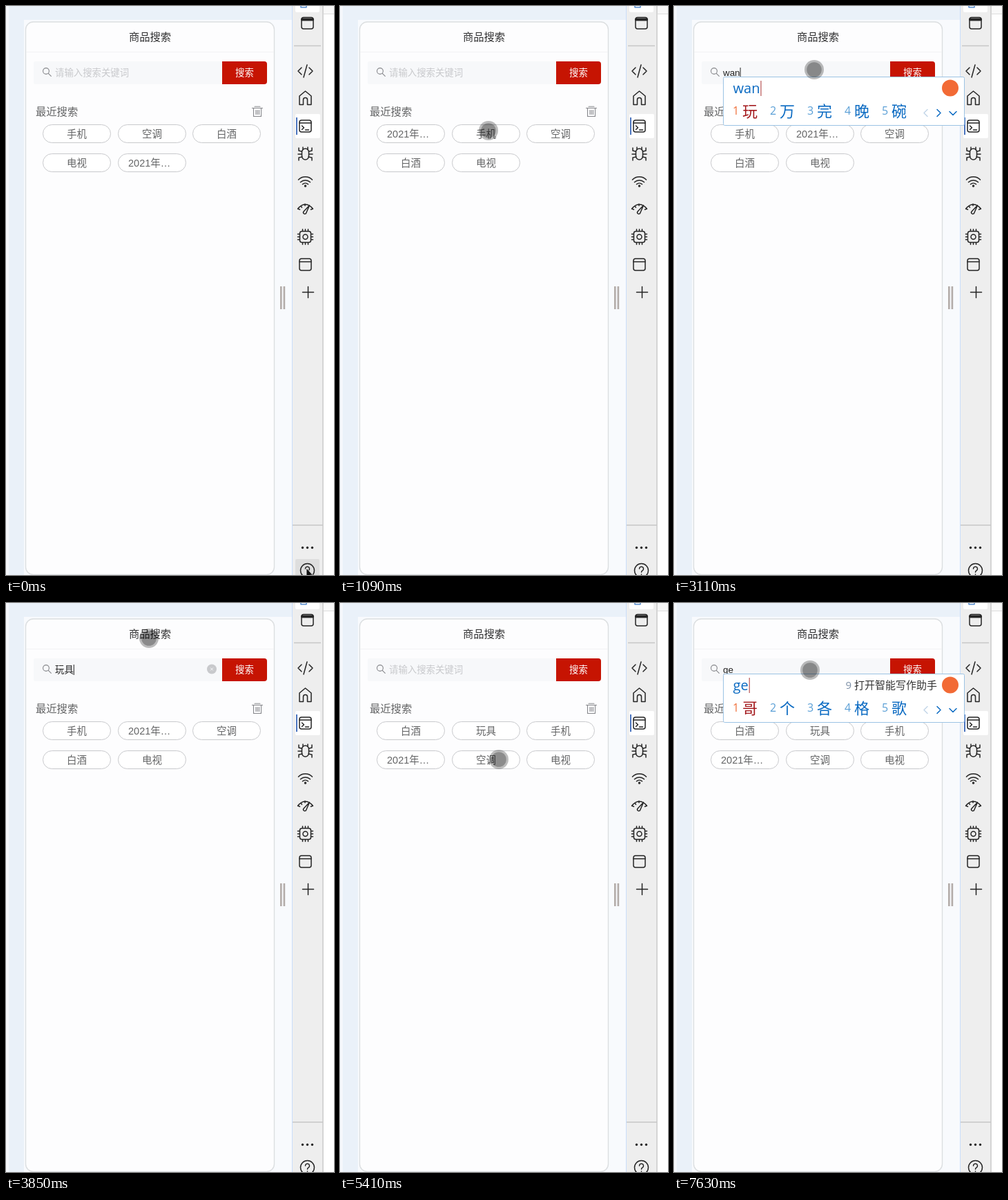
Animation of 475 by 822 pixels, one loop 8000 ms. Source, as an HTML page:

```html
<!DOCTYPE html>
<html lang="zh-CN">
<head>
<meta charset="utf-8">
<title>商品搜索</title>
<style>
  html, body { margin: 0; width: 100%; height: 100%; overflow: hidden; background: #fff; }
  svg { display: block; font-family: "Liberation Sans", "Noto Sans CJK SC", "Noto Sans CJK", sans-serif; }
  .icon { fill: none; stroke: #252525; stroke-width: 1.5; stroke-linecap: round; stroke-linejoin: round; }
  .grey { stroke: #85868a; stroke-width: 1.1; }
  .mid { text-anchor: middle; }
  .tag { fill: #fff; stroke: #c8c9cc; }
  .label { font-size: 14.5px; fill: #646566; }
  .field { font-size: 13.4px; }
  #ime { font-family: "Open Sans", "Noto Sans CJK SC", "Noto Sans CJK", sans-serif; }
</style>
</head>
<body>
<svg width="475" height="822" viewBox="0 0 475 822">
  <!-- backdrop -->
  <rect width="4" height="822" fill="#f5f8fc"/>
  <rect x="4" width="411" height="822" fill="#eaf1f9"/>
  <rect x="26" y="20" width="388" height="802" fill="#f8fafd"/>
  <rect x="28.5" y="23" width="360" height="798.5" rx="11" fill="#fdfdfe" stroke="#dcdfe1" stroke-width="1.4"/>
  <path d="M397 405h2.6v33h-2.6zM401.6 405h2.6v33h-2.6z" fill="#b3aca9"/>

  <!-- page -->
  <text class="mid" x="208.5" y="50" font-size="15.3" fill="#323233">商品搜索</text>
  <path d="M29 66.5h359" stroke="#f2f3f5"/>
  <rect x="40" y="80" width="274" height="33" rx="2" fill="#f7f8fa"/>
  <g class="icon grey"><circle cx="58" cy="94" r="4.4"/><path d="M61.3 97.3l4 4"/></g>
  <path d="M313 80h61a4 4 0 0 1 4 4v25a4 4 0 0 1-4 4h-61z" fill="#c61402"/>
  <text class="mid field" x="345.5" y="100.5" fill="#fff">搜索</text>
  <text class="field" id="hint" x="71" y="100.5" fill="#c8c9cc">请输入搜索关键词</text>
  <text class="field" id="typed" x="71" y="100.5" fill="#222"></text>
  <rect id="caret" y="89" width="1" height="15" fill="#222"/>
  <g id="clear"><circle cx="298" cy="95.5" r="7" fill="#c8c9cc"/><path d="M296 93.5l4 4m0-4l-4 4" stroke="#f7f8fa"/></g>
  <text x="43" y="158" font-size="15.3" fill="#646566">最近搜索</text>
  <path class="icon grey" d="M356.5 147.5h15M358.5 147.5v12h11v-12M360 145.3h8M362 150.5v6m2.2-6v6m2.3-6v6"/>
  <g id="tags"></g>

  <!-- tool strip -->
  <rect x="415" width="44" height="822" fill="#eee"/>
  <path d="M414.5 0v822" stroke="#c9defa"/>
  <path d="M459 0v822" stroke="#ccc" stroke-width="1.6"/>
  <rect x="460" width="15" height="822" fill="#fff"/>
  <path d="M460 0h15v11h-15z" fill="#f8f8f8"/><path d="M460 11.5h15" stroke="#ddd"/>
  <path d="M419 0h35v7a2 2 0 0 1-2 2h-31a2 2 0 0 1-2-2z" fill="#fff"/>
  <path class="icon" d="M427 0v2h8v-2" style="stroke:#5a8fd0"/>
  <path d="M417 57.5h39M415 750h44" stroke="#c6c6c6" stroke-width="1.4"/>
  <rect x="419" y="156" width="36" height="35" rx="2" fill="#fff"/>
  <rect x="420" y="161" width="2" height="25" fill="#4b74be"/>
  <g class="icon">
    <rect x="428" y="16.5" width="17" height="16.5" rx="3"/><path d="M429 19.5h15" stroke-width="4"/>
    <path d="M428 89l-5 5 5 5m11-10l5 5-5 5m-3-14l-5 18"/>
    <path d="M425 130l8.5-7 8.5 7v12.5h-5.5v-7a3 3 0 0 0-6 0v7H425z"/>
    <rect x="425" y="165" width="17" height="17" rx="3"/><path d="M425 169h17M428.5 173l3 2.7-3 2.8m5 .5h5"/>
    <rect x="428.5" y="206" width="10" height="16" rx="5"/>
    <path d="M430 207v-3m7 3v-3M428 210l-4-1v-4m15 5l4-1v-4M428 214h-5m16 0h5M429 218l-5 1v4m14-5l5 1v4"/>
    <path d="M423.5 251a14 14 0 0 1 20 0M426.5 254.5a10 10 0 0 1 14 0M429.5 257.5a6 6 0 0 1 8 0"/><circle cx="433.5" cy="260" r="1"/>
    <path d="M422.500 293q11-13 22 0l-3 1M422.500 293l3 1M433 286v2.500M439.500 288l-8.500 9a2 2 0 0 0 3.500 2.500zM427 289l1.500 2"/>
    <rect x="425.500" y="325.500" width="16" height="16" rx="3"/><circle cx="433.500" cy="333.500" r="3.500"/>
    <path d="M429.500 325v-2.500m4 2.500v-2.500m4 2.500v-2.500M429.500 342v2.500m4-2.500v2.500m4-2.500v2.500M425 329.500h-2.500m2.500 4h-2.500m2.500 4h-2.500M442 329.500h2.500m-2.500 4h2.500m-2.500 4h2.500"/>
    <rect x="425" y="365" width="17" height="17" rx="3"/><path d="M425 369.500h17"/>
    <path d="M429.500 413.500h16m-8-8v16"/>
  </g>
  <g fill="#222"><circle cx="429.500" cy="782.500" r="1.700"/><circle cx="436.500" cy="782.500" r="1.700"/><circle cx="443.500" cy="782.500" r="1.700"/></g>
  <rect id="hover" x="419" y="799" width="35" height="24" rx="2" fill="#dedede"/>
  <g class="icon"><circle cx="436.500" cy="815.500" r="10"/><path d="M433.500 813a3 3 0 1 1 4.500 2.600q-1.500 1-1.500 2.400m0 3v.2"/></g>

  <!-- input method window -->
  <g id="ime" transform="translate(71 102)">
    <rect id="panel" x=".5" y=".5" height="70" rx="2" fill="#fff" stroke="#9cc3e4"/>
    <text id="pinyin" x="14.500" y="24" font-size="20" fill="#0a6ac2"></text>
    <rect id="bar" y="6" width="1" height="22" fill="#a33"/>
    <g id="words"></g>
    <g id="right">
      <text id="assist" x="-40" y="22" font-size="15" fill="#333" text-anchor="end"><tspan fill="#7c8fa6">9</tspan> 打开智能写作助手</text>
      <circle cx="-21" cy="16.500" r="12" fill="#f26a35"/>
      <g class="icon"><path d="M-54 47.500l-5 5 5 5" style="stroke:#c3d6e8"/><path d="M-40 47.500l5 5-5 5M-22 50.500l5 5 5-5" style="stroke:#0a6ac2"/></g>
    </g>
  </g>

  <g id="touch"><circle r="14" opacity=".26"/><circle r="10.800" opacity=".26"/></g>
  <path id="arrow" d="M-3-4v14l3.200-3 2.200 5 2-1-2.200-4.800h4.300z" fill="#111" stroke="#fff" stroke-width=".7"/>
</svg>
<script>
const LOOP = 8000, YEAR = '2021年…';
const $ = id => document.getElementById(id);
const show = (id, on) => $(id).style.display = on ? '' : 'none';
const current = (steps, t) => steps.filter(s => s[0] <= t).pop();

// [time, x, y]
const path = [
  [0, 438, 816], [760, 221, 231], [830, 221, 231], [1090, 215, 180], [1200, 215, 180],
  [1660, 203, 90], [1780, 203, 92], [3660, 203, 92], [3850, 207, 51], [3920, 216, 41],
  [4400, 343, 93], [4500, 343, 93], [4700, 320, 147], [5300, 230, 230], [5360, 230, 226],
  [5940, 193, 96], [6120, 197, 97], [LOOP, 197, 97]
];

const history = [
  [0, '手机', '空调', '白酒', '电视', YEAR],
  [830, YEAR, '手机', '空调', '白酒', '电视'],
  [1260, '手机', YEAR, '空调', '白酒', '电视'],
  [4440, '玩具', '手机', YEAR, '空调', '白酒', '电视'],
  [5300, '白酒', '玩具', '手机', YEAR, '空调', '电视']
];

// [time, text, field caret, candidates, assistant hint, window caret]
const typing = [
  [0, '', 0], [1780, '', 1], [2280, '', 0], [2790, '', 1],
  [2880, 'w', 1, '我 为 无 玩 万', 0, 1],
  [2970, 'wa', 1, '哇 挖 娃 瓦 蛙', 0, 1],
  [3060, 'wan', 1, '玩 万 完 晚 碗', 0, 1],
  [3160, "wan'ju", 1, '玩具 晚居 万句 完局 玩剧', 0, 1],
  [3360, '玩具', 1], [3860, '玩具', 0], [4360, '玩具', 1], [4440, '', 0],
  [5940, '', 1], [6430, '', 0], [6990, '', 1],
  [7060, 'g', 1, '个 给 更 过 刚', 0, 1],
  [7130, 'ge', 1, '哥 个 各 格 歌', 0, 1],
  [7500, 'ge', 0, '哥 个 各 格 歌', 1, 0],
  [7630, 'ge', 0, '哥 个 各 格 歌', 1, 1]
];

// The pointer advances in short hops rather than continuously.
function pointer(t) {
  const i = path.findIndex(k => k[0] > t);
  const [t0, x0, y0] = path[i - 1], [t1, x1, y1] = path[i];
  const hops = Math.max(1, Math.round((t1 - t0) / 65));
  const u = Math.floor((t - t0) / (t1 - t0) * hops) / hops;
  return [x0 + (x1 - x0) * u, y0 + (y1 - y0) * u];
}

function drawTags([, ...names]) {
  $('tags').innerHTML = names.map((name, i) => {
    const x = [53.5, 162.5, 270.5][i % 3], y = i < 3 ? 171.5 : 213.5;
    const place = name === YEAR ? `x="${x + 14.5}"` : `x="${x + 49}" text-anchor="middle"`;
    return `<rect class="tag" x="${x}" y="${y}" width="98" height="26" rx="13"/>` +
      `<text class="label" ${place} y="${y + 18.5}">${name}</text>`;
  }).join('');
}

function drawInput([, text, caret, words, assist, bar]) {
  $('typed').textContent = text;
  $('caret').setAttribute('x', 71 + (text ? $('typed').getComputedTextLength() : 0));
  show('hint', !text);
  show('caret', caret);
  show('clear', text && !words);
  show('ime', words);
  if (!words) return;
  let x = 14;
  $('words').innerHTML = words.split(' ').map((word, i) => {
    const [num, ink] = i ? ['#5a9fd6', '#0a6ac2'] : ['#f0703a', '#a3181c'];
    const part = `<text x="${x}" y="55" font-size="16" fill="${num}">${i + 1}</text>` +
      `<text x="${x + 14}" y="58" font-size="22" fill="${ink}">${word}</text>`;
    x += 32 + 22 * word.length;
    return part;
  }).join('');
  const width = x + 66;
  $('panel').setAttribute('width', width - 1);
  $('right').setAttribute('transform', `translate(${width})`);
  $('pinyin').textContent = text;
  $('bar').setAttribute('x', 15.5 + $('pinyin').getComputedTextLength());
  show('assist', assist);
  show('bar', bar);
}

let tags, input;
function frame(now) {
  const t = now % LOOP, [x, y] = pointer(t);
  const nextTags = current(history, t), nextInput = current(typing, t);
  if (tags !== nextTags) drawTags(tags = nextTags);
  if (input !== nextInput) drawInput(input = nextInput);
  const inside = x < 389;
  show('touch', inside);
  show('arrow', !inside);
  show('hover', x > 419 && y > 799);
  for (const id of ['touch', 'arrow']) $(id).setAttribute('transform', `translate(${x} ${y})`);
  requestAnimationFrame(frame);
}
frame(performance.now());
</script>
</body>
</html>
```
